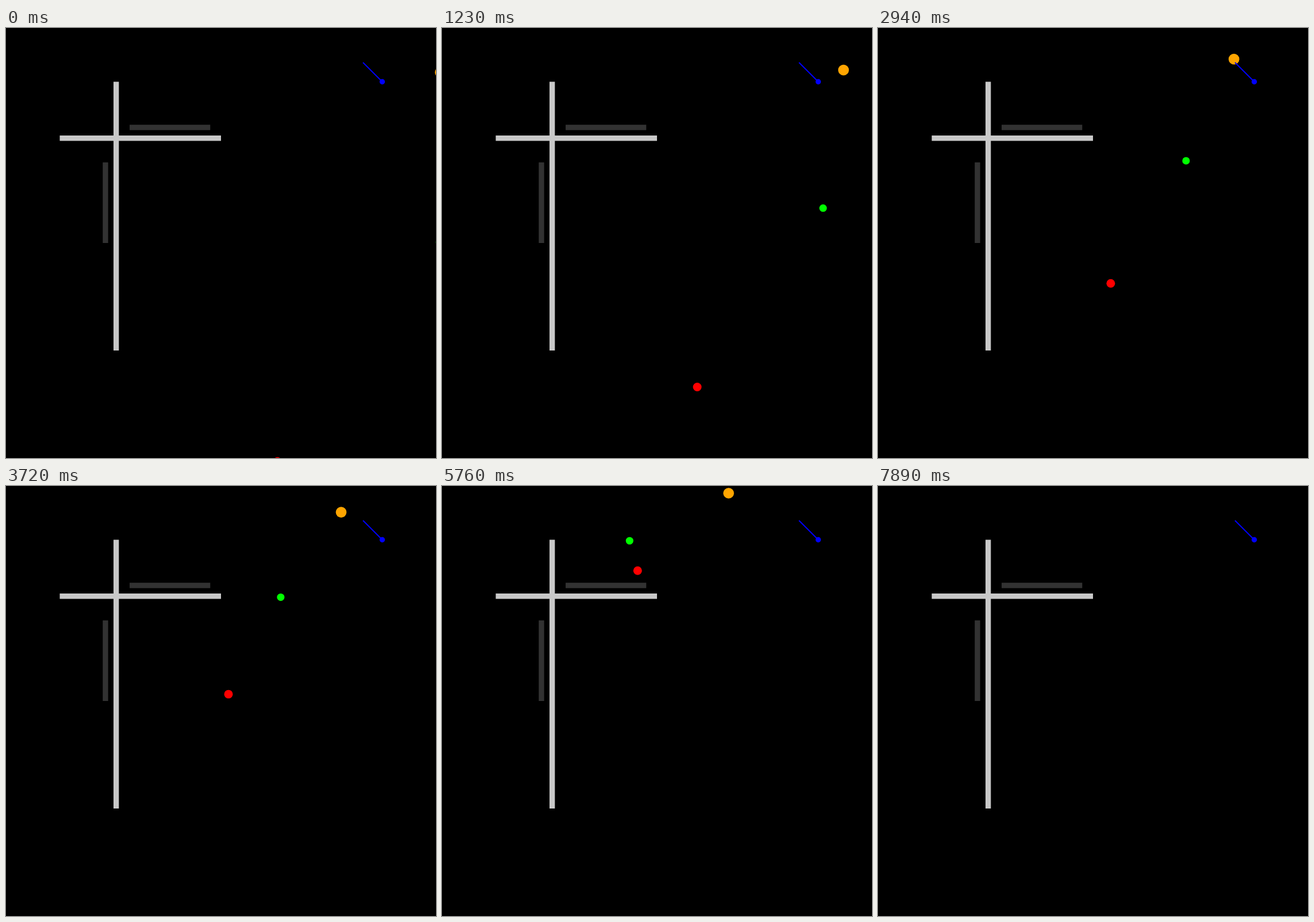
These frames come from a looping animation (748x748 px, 9.88 s). An HTML page with a canvas:

```html
<!DOCTYPE html>
<html>
<head>
<meta charset="utf-8">
<style>
  html, body { margin: 0; height: 100%; overflow: hidden; background: #000; }
  canvas { display: block; }
</style>
</head>
<body>
<canvas id="stage" width="748" height="748"></canvas>
<script>
const ctx = document.getElementById('stage').getContext('2d');
const UNIT = 748 / 80, LOOP = 9880, STEP = 30;

function bar(color, x, y, w, h) {
  ctx.fillStyle = color;
  ctx.fillRect(x * UNIT, y * UNIT, w * UNIT, h * UNIT);
}

function ball(color, x, y, radius) {
  ctx.fillStyle = color;
  ctx.beginPath();
  ctx.arc(x, y, radius * UNIT, 0, 2 * Math.PI);
  ctx.fill();
}

// Orange drifts left, turns once vertically near the start, then is kicked up and right.
function orangeAt(k) {
  const kick = Math.max(0, k - 188.35);
  return [
    755.5 - 1.391 * k + 2.78 * kick,
    82 - 0.333 * Math.abs(k - 14.5) - 2.85 * kick
  ];
}

function draw(k) {
  ctx.fillStyle = '#000';
  ctx.fillRect(0, 0, 748, 748);
  bar('#c8c8c8', 20, 10, 1, 50);
  bar('#c8c8c8', 10, 20, 30, 1);
  bar('#323232', 23, 18, 15, 1);
  bar('#323232', 18, 25, 1, 15);

  ball('#f00', 472.2 - 0.687 * k, 754.1 - 3.161 * k, 0.8);
  ball('#0f0', 754.3 - 2.229 * k, 372.5 - 1.444 * k, 0.7);
  ball('#ffa500', ...orangeAt(k), 1);

  ctx.strokeStyle = '#00f';
  ctx.lineWidth = 2;
  ctx.beginPath();
  ctx.moveTo(621, 60);
  ctx.lineTo(654.5, 93.5);
  ctx.stroke();
  ball('#00f', 654.5, 93.5, 0.5);
}

function tick() {
  draw(Math.floor(performance.now() % LOOP / STEP));
  requestAnimationFrame(tick);
}
tick();
</script>
</body>
</html>
```
